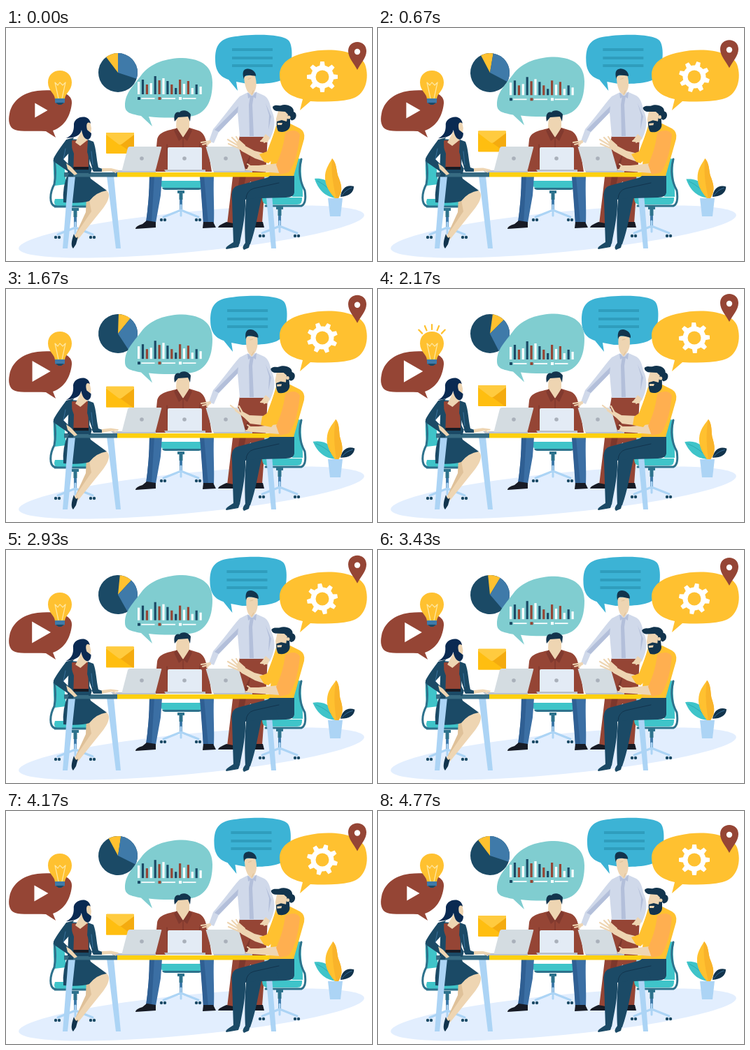
Recreate the animation shown at these times as an HTML page with a canvas. Size 523 by 334 pixels, loop 4810 ms.

```html
<!DOCTYPE html>
<html lang="en">
<head>
<meta charset="utf-8">
<title>Team meeting</title>
<style>
html, body { margin: 0; width: 100%; height: 100%; overflow: hidden; background: #fff; }
canvas { display: block; width: 523px; height: 334px; }
</style>
</head>
<body>
<canvas id="stage"></canvas>
<script>
const W = 523, H = 334, LOOP = 4810, RISE = 2200;
const C = {
  floor: '#e2eefe', red: '#954535', redDark: '#7d372c', yellow: '#ffc130', amber: '#f9b32a',
  orange: '#ffaf50', desk: '#fdd00f', teal: '#3fc4c9', mint: '#80cdd0', sky: '#3cb3d5', line: '#2f9dbd',
  navy: '#1b4a66', ink: '#12344d', hair: '#0a2a52', blue: '#3f7aa9', jeans: '#3b6fa4',
  pale: '#acd4f5', skin: '#eed5b2', skinDark: '#dfc199', shirt: '#d0d9ea', shade: '#b3bfda',
  frame: '#2d728c', black: '#171b25', grey: '#d4dce1', mark: '#a9b0ba', white: '#fff'
};
const canvas = document.getElementById('stage');
const ratio = window.devicePixelRatio || 1;
canvas.width = W * ratio;
canvas.height = H * ratio;
const g = canvas.getContext('2d');
g.lineCap = g.lineJoin = 'round';

const cache = {};
const path = d => cache[d] || (cache[d] = new Path2D(d));
function fill(color, d) {
  g.fillStyle = color;
  g.fill(path(d));
}
function stroke(color, width, d) {
  g.strokeStyle = color;
  g.lineWidth = width;
  g.stroke(path(d));
}
function disc(color, x, y, r) {
  g.fillStyle = color;
  g.beginPath();
  g.arc(x, y, r, 0, 7);
  g.fill();
}
function box(color, x, y, w, h) {
  g.fillStyle = color;
  g.fillRect(x, y, w, h);
}
function shift(x, y, draw) {
  g.save();
  g.translate(x, y);
  draw();
  g.restore();
}
function turn(x, y, degrees, draw) {
  g.save();
  g.translate(x, y);
  g.rotate(degrees * Math.PI / 180);
  g.translate(-x, -y);
  draw();
  g.restore();
}

function floor() {
  g.fillStyle = C.floor;
  g.beginPath();
  g.ellipse(265, 292, 248, 29, -0.097, 0, 7);
  g.fill();
}

function pie(k) {
  const slice = (color, from, to) => {
    g.fillStyle = color;
    g.beginPath();
    g.moveTo(160, 64);
    g.arc(160, 64, 28, from * Math.PI / 180, to * Math.PI / 180);
    g.fill();
  };
  turn(160, 64, 45 * k, () => {
    disc(C.navy, 160, 64, 28);
    slice(C.yellow, -127, -90);
    slice(C.blue, -90, 18);
  });
}

function textBubble(k) {
  shift(-8 * k, 0, () => {
    fill(C.sky, 'M322 13C350 8 395 8 404 18C412 28 408 58 402 68C394 80 370 80 345 80L329 77L331 90L318 74C306 70 299 62 299 45C299 28 303 17 322 13Z');
    for (const y of [29, 41, 52]) box(C.line, 323, y, 58, 4);
  });
}

const bars = [18, 21, 14, 16, 26, 20, 23, 19, 14, 9, 21, 15, 19, 9, 14, 11];
const barColors = 'wdrwdrwdrdrwrwdw';
const chartColors = { w: C.white, d: C.navy, r: C.red };
function chartBubble(k) {
  shift(0, -7.5 * k, () => fill(C.mint, 'M193 68C206 50 230 43 252 43C281 44 295 56 295 78C295 105 286 124 262 127C246 129 222 129 204 127L209 141L193 126C177 123 170 121 170 111C170 94 181 84 193 68Z'));
  shift(0, 6 * k, () => {
    bars.forEach((h, i) => box(chartColors[barColors[i]], 188 + i * 5.9, 95 - h, 3.2, h));
    [...'drw'].forEach((c, i) => {
      const x = 188 + i * 29.5;
      box(chartColors[c], x, 99, 4, 4);
      box(C.white, x + 5.5, 100.2, 19, 1.7);
    });
  });
}

function playBubble(k) {
  fill(C.red, 'M45 90C70 87 96 92 94 108C92 128 82 142 67 147L71 157L57 148C40 147 22 149 13 146C4 143 3 132 5 123C8 106 22 93 45 90Z');
  g.save();
  g.translate(50, 118);
  g.scale(1 + 0.5 * k, 1 + 0.5 * k);
  fill(C.white, 'M-8.7-10.5L9.5 0L-8.7 10.5Z');
  g.restore();
}

function bulb(glow) {
  fill(C.yellow, 'M70 102C70 94 60 90 60 78C60 67 68 61 77 61C87 61 94 68 94 78C94 90 84 94 84 102Z');
  stroke('#ffe7a0', 1.2, 'M75 101L70 78L74 82L77 78L81 82L85 78L80 101');
  fill(C.blue, 'M70 101H84V106Q84 108 81 108L79 110H75L73 108Q70 108 70 106Z');
  fill(C.navy, 'M71 107H83L79 110H75Z');
  if (!glow) return;
  g.globalAlpha = glow;
  for (const a of [-44, -22, 0, 22, 44]) {
    turn(77, 78, a, () => stroke(C.yellow, 2.2, 'M77 58V51'));
  }
  g.globalAlpha = 1;
}

function gearBubble(k, swing) {
  fill(C.yellow, 'M430 35C465 27 505 33 513 52C520 72 514 97 492 102C475 106 455 106 435 105L420 118L424 102C402 97 391 87 391 66C392 48 410 39 430 35Z');
  for (let i = 0; i < 8; i++) {
    turn(452, 70, 90 * swing + 45 * i, () => fill(C.white, 'M448 56L449.2 48H454.8L456 56Z'));
  }
  disc(C.white, 452, 70, 16.5);
  disc(C.yellow, 452, 70, 9.5);
  shift(0, -13 * k, () => {
    fill(C.red, 'M502 60C497 50 489 43 489 33C489 25 495 20 502 20C509 20 515 25 515 33C515 43 507 50 502 60Z');
    disc(C.white, 502, 34, 4.2);
  });
}

function envelope(k) {
  shift(0, -12 * k, () => {
    fill('#ffbe10', 'M144 150H182Q183 150 183 151V179Q183 180 182 180H144Q143 180 143 179V151Q143 150 144 150Z');
    fill('#f4ab0f', 'M183 153L163 167L181 180H183Z');
    fill('#ffcb3f', 'M143 151L144 150H182L183 151V153L166 166Q163 168.5 160 166L143 153Z');
  });
}

function plant(k) {
  turn(470, 244, 2 - 6 * k, () => {
    fill(C.teal, 'M473 244C462 243 448 239 440 217C457 215 469 224 473 244Z');
    stroke('#2aa3ad', .8, 'M444 220Q461 228 472 243');
  });
  turn(480, 242, 6 * k, () => {
    fill(C.ink, 'M478 242C479 230 487 224 497 227C497 236 490 241 478 242Z');
    stroke(C.blue, .8, 'M480 240Q485 232 494 229');
  });
  turn(471, 244, 6 * k, () => {
    fill(C.yellow, 'M470 244C461 234 455 224 456 211C457 200 463 193 466 187C472 193 472 203 474 211C478 221 483 232 475 244Z');
    fill(C.amber, 'M472 244C468 227 464 207 466 187C472 193 472 203 474 211C478 221 483 232 475 244Z');
  });
  fill(C.pale, 'M460 244H481L478 270H463Z');
}

function chairBase(x, y) {
  box(C.frame, x - 5, y - 25, 10, 4);
  box(C.frame, x - 2.5, y - 22, 5, 10);
  box(C.blue, x - 2, y - 12, 4, 16);
  stroke(C.pale, 3, `M${x} ${y + 3}L${x - 25} ${y + 13}M${x} ${y + 3}L${x + 25} ${y + 13}M${x} ${y - 4}V${y + 11}`);
  for (const d of [-28, -23, 22, 27]) disc(C.navy, x + d, y + 17, 2.2);
}

function middleChair() {
  chairBase(250, 258);
  fill(C.teal, 'M222 219H280V226Q280 229 277 229H226Q222 229 222 226Z');
  fill(C.frame, 'M223 229H280Q279 232 275 232H228Q224 232 223 229Z');
}

function leftChair() {
  chairBase(99, 283);
  fill(C.teal, 'M68 191Q78 189 83 195L86 224L70 226Q67 207 68 191Z');
  stroke(C.frame, 3, 'M69 190Q72 207 69 224C62 237 62 252 69 255H111');
  fill(C.teal, 'M70 245H121Q122 255 115 255H73Q67 253 70 245Z');
  stroke(C.frame, 3, 'M70 256H115');
}

function rightChair() {
  chairBase(391, 281);
  fill(C.teal, 'M411 188Q420 185 423 190C419 207 425 220 424 242H409Z');
  stroke(C.frame, 3, 'M422 188C417 207 421 222 427 233C429 246 427 253 422 255H371');
  fill(C.teal, 'M366 243H423Q424 253 416 253H372Q366 252 366 243Z');
}

function standingMan(k) {
  fill(C.red, 'M334 154H374L371 211L366 280H356L350 220L338 230L324 281H316L325 205Z');
  fill(C.redDark, 'M350 180L343 212L329 281H324L334 212Z');
  fill(C.black, 'M315 278L325 280V286H303Q303 283 315 278ZM356 278H367L369 286H354Z');
  fill(C.shirt, 'M344 93L334 98C323 110 309 130 296 145L290 162L297 165L304 149L331 121L334 156H375L376 144L370 157L377 160C383 147 387 133 379 117C377 105 373 98 367 96L358 92Z');
  fill(C.shade, 'M332 112L331 121L304 149L298 146ZM371 108L379 127L375 146L376 125Z');
  fill(C.shade, 'M349 97H354L352 110L354 155H348L347 110Z');
  fill(C.skin, 'M371 152L377 157L374 164L363 163Z');
  stroke(C.skin, 2, 'M372 157L364 162M374 160L369 164');
  turn(351, 93, -9 * (1 - k), () => {
    fill(C.skin, 'M344 68L359 67C361 76 360 85 356 91L351 97L346 91C343 84 343 75 344 68Z');
    stroke(C.skinDark, 1, 'M349 73L353 72M354 90L351 95');
    fill(C.ink, 'M343 72C342 62 344 58 350 58C355 58 362 63 361 70C357 69 351 67 347 67Q344 68 343 72Z');
  });
  fill(C.shade, 'M345 92L351 98L346 101ZM358 91L352 98L357 101Z');
}

function middleMan() {
  fill(C.jeans, 'M205 212H223L221 240L214 279H200C203 257 205 235 205 212ZM277 212H297C296 237 298 260 297 280H282C281 254 279 234 277 212Z');
  fill('#2f5f93', 'M205 212H212L208 279H200C203 257 205 235 205 212ZM277 212H283L289 280H282Z');
  fill(C.black, 'M201 276L214 278V286L185 288Q185 284 195 281ZM282 278H296L300 286L281 287Z');
  fill(C.red, 'M243 144C230 147 218 149 216 160L213 190V206H294L290 181C286 161 285 151 275 147L262 143Z');
  stroke(C.redDark, 1.2, 'M230 167L232 200M277 166L275 200M253 157V171');
  fill(C.skin, 'M244 124H262L262 143L258 151L253 157L246 150L243 141Z');
  fill('#813a2f', 'M244 143L253 157L247 162L240 147ZM262 143L253 157L259 162L266 147Z');
  fill(C.ink, 'M241 134C239 125 242 119 248 121C250 117 260 117 264 124L263 134L260 127L246 128Z');
}

function womanLower() {
  fill(C.skinDark, 'M115 240L136 233L131 255L104 301L98 299L114 264Z');
  fill(C.skin, 'M118 241L142 232C150 236 148 246 139 258L103 303L97 300L122 263Z');
  fill(C.ink, 'M97 295Q100 304 103 299L100 310L96 316Q91 312 97 295Z');
  fill(C.navy, 'M89 207H118L121 216L144 233Q129 235 119 248Q106 252 82 250Q80 228 89 207Z');
}

function womanUpper(k) {
  fill(C.navy, 'M90 159L120 161L119 208H88Z');
  fill(C.red, 'M94 161H117L118 201H95Z');
  box(C.black, 95, 199, 23, 4);
  fill(C.navy, 'M97 157L86 160C80 168 72 179 68 187Q67 191 72 194L92 208L97 203L82 188L92 177L94 200L88 213H96L97 180L92 166Z');
  fill(C.navy, 'M117 160L125 163C129 173 129 187 132 200L138 202V206L125 206L119 195L118 209H121L123 200L116 178Z');
  stroke(C.blue, .8, 'M85 173L82 188M122 177L124 196');
  fill(C.skin, 'M86 194L93 199L102 209L98 211L88 202Z');
  turn(137, 204, 4 - 7 * k, () => {
    fill(C.skin, 'M137 201L150 200L161 202L160 204L151 204L137 206Z');
    stroke(C.skin, 1.3, 'M150 202L157 206');
  });
  turn(107, 160, -3 * k, () => {
    fill(C.skin, 'M108 148L117 146L116 161L106 169L99 164Z');
    fill(C.skin, 'M111 132L120 133L122 144L121 151L116 154L109 149Z');
    fill(C.hair, 'M97 140C96 131 106 126 114 128Q120 130 121 137C116 133 114 138 116 146L122 151Q122 158 117 160C111 159 109 152 108 146C106 155 98 157 86 158C95 154 97 147 97 140Z');
  });
}

function table() {
  fill(C.pale, 'M89 212H99L88 316H81ZM144 212H154L164 316H157ZM369 212H378L386 316H379Z');
  box('#376b82', 83, 207, 76, 6.5);
  box(C.desk, 159, 207, 222, 6.5);
}

function laptops() {
  fill('#bbc1cc', 'M150 204H214V207H153ZM226 203H285V206H228ZM296 204H352V207H297Z');
  fill(C.grey, 'M177 170H221Q223 170 222 172L214 203Q213 205 211 205H167Q165 205 166 203L174 172Q175 170 177 170Z');
  fill('#e3ebf5', 'M233 171H278Q280 171 280 173V203H231V173Q231 171 233 171Z');
  fill(C.grey, 'M287 170H330Q332 170 333 172L342 203Q342 205 340 205H298Q296 205 295 203L286 172Q285 170 287 170Z');
  for (const x of [194, 255, 314]) disc(C.mark, x, 187, 2.8);
}

function beardedLegs() {
  fill(C.navy, 'M377 212H412V236Q411 243 400 243L365 244C360 265 357 288 349 310H342C341 285 341 260 344 238Z');
  fill(C.navy, 'M379 213L331 226C322 229 322 237 323 247L325 309H334C338 287 343 265 342 246L390 239Z');
  stroke(C.ink, 1, 'M390 222L354 230Q344 233 343 244');
  fill(C.navy, 'M325 307L334 308L332 314L315 317Q311 315 325 307ZM342 308H349L347 315L340 318Q336 315 342 308Z');
}

function beardedHead(k) {
  turn(398, 148, -7 * k, () => {
    fill(C.skin, 'M389 119H406L404 143L396 149L387 145L386 130Z');
    fill(C.ink, 'M381 113C385 109 390 112 393 111C401 108 412 113 411 120C417 122 415 131 410 132C408 133 407 132 406 130V140C405 147 397 151 389 148Q386 143 387 134L394 132L401 134L403 124L399 120L386 119Q381 117 381 113Z');
    fill(C.skin, 'M388 136L395 136L394 139H388Z');
    disc(C.skin, 404, 128, 2.5);
  });
}

function openArm() {
  fill(C.skin, 'M371 180L374 193L356 187L336 176L340 168L355 176Z');
  fill(C.skin, 'M342 168L333 160L329 164L332 173L340 178Z');
  stroke(C.skin, 2.2, 'M337 168L329 156M334 168L323 157M334 170L317 160M334 173L318 166');
  fill(C.yellow, 'M386 143L400 148L389 181L375 194L369 192L362 181L373 177Z');
}

function pointingArm() {
  fill(C.skin, 'M371 182L374 196L349 193L337 181L335 174L348 181Z');
  stroke(C.skin, 2.2, 'M339 179L333 168M338 180L321 167M342 184L328 174');
  fill(C.yellow, 'M386 143L400 148L391 183L379 198L364 195L366 183L373 178Z');
}

function beardedMan(t, k) {
  fill(C.yellow, 'M386 140L406 137L420 144Q428 149 426 159L411 212H376L379 186L377 170Z');
  fill(C.skin, 'M389 194L391 208L365 206L350 205L344 203L347 197L361 197Z');
  stroke(C.skin, 2, 'M352 200L345 195M350 203L343 203');
  fill(C.orange, 'M399 150Q415 143 420 153C418 172 414 194 404 207L391 210L386 196C392 183 397 168 399 150Z');
  (t > 1000 && t < 2500 ? pointingArm : openArm)();
  beardedHead(k);
}

const ease = u => (1 - Math.cos(Math.PI * u)) / 2;

function render(t) {
  const away = Math.min(t, LOOP - t);
  const k = ease(Math.min(1, away / RISE));
  const swing = ease(2 * t / LOOP);
  const nod = ease(4 * t / LOOP);
  const glow = Math.max(0, Math.min(1, (t - 1850) / 120, (2780 - t) / 120));

  g.setTransform(ratio, 0, 0, ratio, 0, 0);
  box(C.white, 0, 0, W, H);
  floor();
  pie(k);
  textBubble(k);
  chartBubble(k);
  playBubble(k);
  bulb(glow);
  gearBubble(k, swing);
  envelope(k);
  plant(k);
  middleChair();
  standingMan(k);
  middleMan();
  leftChair();
  rightChair();
  womanLower();
  table();
  laptops();
  stroke(C.skin, 2, 'M292 162L279 164M292 164L281 167M292 163L287 168');
  womanUpper(k);
  beardedLegs();
  beardedMan(t, nod);
}

function tick() {
  render(performance.now() % LOOP);
  requestAnimationFrame(tick);
}
tick();
</script>
</body>
</html>
```
